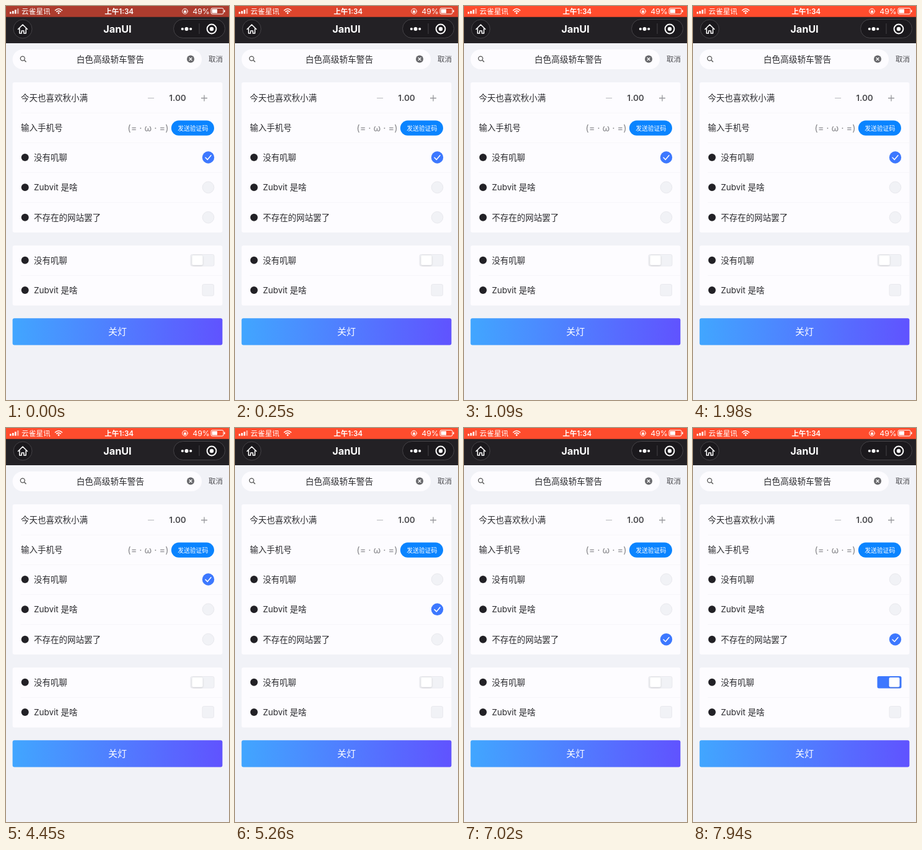
These frames come from a looping animation (360 px wide and 635 px high, 8000 ms). An HTML page:

```html
<!DOCTYPE html>
<html lang="zh-CN">
<head>
<meta charset="utf-8">
<title>JanUI</title>
<style>
html, body { margin: 0; width: 100%; height: 100%; overflow: hidden; background: #f1f2f7; }
svg { display: block; width: 360px; height: 635px; }
text { font: 13.5px Inter, "Noto Sans CJK SC", "Noto Sans CJK", sans-serif; fill: #2b2b2f; }
.mid { text-anchor: middle; }
.white { fill: #fff; }
.card { fill: #fdfcff; }
.line { fill: none; stroke: #fff; stroke-linecap: round; stroke-linejoin: round; }
.rule { stroke: #f7f6fa; }
.off { fill: #f1f2f6; stroke: #e9e9ee; }
</style>
</head>
<body>
<svg viewBox="0 0 360 635">
  <defs>
    <linearGradient id="blue"><stop stop-color="#41a6ff"/><stop offset="1" stop-color="#6053ff"/></linearGradient>
    <filter id="shadow" x="-30%" y="-30%" width="160%" height="160%">
      <feDropShadow dx="0" dy=".6" stdDeviation=".8" flood-opacity=".25"/>
    </filter>
  </defs>
  <rect width="360" height="635" fill="#f1f2f7"/>

  <g id="status">
    <rect width="360" height="18" fill="#ff4c2d"/>
    <rect id="dim" width="360" height="18" fill="#ad3c2e"/>
    <path class="white" d="M6 9.5h2.6v3H6zM10 8h2.6v4.5H10zM14 6h2.6v6.5H14z"/>
    <path d="M18 4h2.6v8.5H18z" fill="#fff" opacity=".5"/>
    <text class="white" x="25" y="12.6" style="font-size:11.7px">云雀星讯</text>
    <path class="line" d="M79.5 7q5.5-5 11 0M81.8 9.2q3.2-2.8 6.4 0" stroke-width="1.6"/>
    <circle class="white" cx="85" cy="11.4" r="1.4"/>
    <text class="white mid" x="182.6" y="12.5" style="font-size:11.6px;font-weight:600">上午1:34</text>
    <circle class="line" cx="289" cy="8.5" r="4.3"/>
    <path class="white" d="M287 8h4v3h-4z"/>
    <path class="line" d="M288 8v-1q1-1.5 2 0v1" stroke-width=".8"/>
    <text class="white" x="301.3" y="12.6" style="font-size:12.3px">49%</text>
    <rect class="line" x="331" y="3.5" width="20" height="9.5" rx="2"/>
    <path class="white" d="M332.5 5h8.5v6.5h-8.5zM352 6.5h1.5v3.5H352z"/>
  </g>

  <g id="nav">
    <rect y="17.7" width="360" height="42.3" fill="#232125"/>
    <circle cx="27" cy="37" r="15" fill="#1b191d" stroke="#454347"/>
    <path class="line" d="M19.5 37.5L27 30l7.5 7.5M21.8 36v8h3.4v-4h3.6v4h3.4v-8" stroke-width="1.5"/>
    <text class="white mid" x="180" y="42.5" style="font-size:16.2px;font-weight:700">JanUI</text>
    <rect x="270.5" y="21.5" width="83" height="30" rx="15" fill="#1b191d" stroke="#454347"/>
    <path d="M312 28v17" stroke="#454347"/>
    <circle class="white" cx="284.8" cy="37" r="2.1"/>
    <circle class="white" cx="291.5" cy="37" r="3"/>
    <circle class="white" cx="298.2" cy="37" r="2.1"/>
    <circle class="line" cx="332" cy="37" r="7.4" stroke-width="2"/>
    <circle class="white" cx="332" cy="37" r="3.2"/>
  </g>

  <g id="search">
    <rect class="card" x="10.6" y="70" width="305.4" height="32" rx="16"/>
    <circle cx="26.8" cy="84.6" r="3.5" fill="none" stroke="#555" stroke-width="1.3"/>
    <path d="M29.5 87.3l3 3" stroke="#555" stroke-width="1.4"/>
    <text class="mid" x="168.4" y="90.6" style="font-size:13.7px">白色高级轿车警告</text>
    <circle cx="298" cy="85.5" r="6" fill="#68686c"/>
    <path class="line" d="M296 83.5l4 4m0-4l-4 4" stroke-width="1.2"/>
    <text x="327" y="89.8" style="font-size:11.5px;fill:#4c4c50">取消</text>
  </g>

  <g id="cards">
    <rect class="card" x="10.6" y="123" width="338.8" height="242" rx="3"/>
    <rect class="card" x="10.6" y="386" width="338.8" height="96.8" rx="3"/>
    <path class="rule" d="M24 172.5h326M24 220.5h326M24 268.5h326M24 316.5h326M24 434.5h326"/>
    <text x="24" y="153">今天也喜欢秋小满</text>
    <path d="M229 148.5h10" stroke="#c4c4c8" stroke-width="1.3"/>
    <text class="mid" x="277" y="153.2" style="font-weight:600;fill:#4a4a4e">1.00</text>
    <path d="M315 148.5h10m-5-5v10" stroke="#97979b" stroke-width="1.3"/>
    <text x="24" y="201.4">输入手机号</text>
    <text class="mid" x="229.4" y="201.6" style="font-size:14.5px;fill:#858589">(= · ω · =)</text>
    <rect x="266.8" y="184.6" width="69.2" height="24.2" rx="12.1" fill="#0a84ff"/>
    <text class="white mid" x="301.7" y="200.5" style="font-size:9.8px;font-weight:500">发送验证码</text>
  </g>

  <g id="rows"></g>

  <g id="switch">
    <rect class="off" x="298" y="400.5" width="38" height="18.5" rx="2.5"/>
    <rect id="track" x="297.5" y="400" width="39" height="19.5" rx="2.5" fill="#3d78ff"/>
    <rect id="knob" class="white" y="402" width="17" height="15.5" rx="2" filter="url(#shadow)"/>
  </g>
  <rect class="off" x="317" y="448.5" width="18.5" height="18.5" rx="2.5"/>

  <rect x="10.6" y="503.3" width="338.8" height="43.2" rx="3" fill="url(#blue)"/>
  <text class="white mid" x="180" y="530.4" style="font-size:15px">关灯</text>
</svg>
<script>
const LOOP = 8000, SECOND_TAP = 4480, THIRD_TAP = 5290, SWITCH_TAP = 7050;
const $ = id => document.getElementById(id);
const ramp = (t, start, length) => Math.min(1, Math.max(0, (t - start) / length));
const radioY = [244, 292.3, 340.7];

const row = (label, y) => `
  <circle cx="30.7" cy="${y}" r="6" fill="#222126"/>
  <text x="45" y="${y + 4.9}">${label}</text>`;
const radio = (y, i) => `
  <circle class="off" cx="326.5" cy="${y}" r="9.3"/>
  <g id="radio${i}">
    <circle cx="326.5" cy="${y}" r="9.7" fill="#3d78ff"/>
    <path class="line" d="M322 ${y + .3}l3.3 3.3 5.7-6.8" stroke-width="1.5"/>
  </g>`;

const labels = ['没有叽聊', 'Zubvit 是啥', '不存在的网站罢了'];
$('rows').innerHTML = radioY.map((y, i) => row(labels[i], y) + radio(y, i)).join('')
  + row(labels[0], 409.7) + row(labels[1], 458);

function draw(now) {
  const t = now % LOOP;
  $('dim').setAttribute('opacity', 1 - ramp(t, 40, 350));

  const selected = t < SECOND_TAP ? 0 : t < THIRD_TAP ? 1 : 2;
  radioY.forEach((_, i) => $('radio' + i).setAttribute('opacity', +(i === selected)));

  const p = ramp(t, SWITCH_TAP, 250);
  const eased = p * p * (3 - 2 * p);
  $('track').setAttribute('opacity', eased);
  $('knob').setAttribute('x', 300.5 + 16 * eased);
  requestAnimationFrame(draw);
}
draw(performance.now());
</script>
</body>
</html>
```
